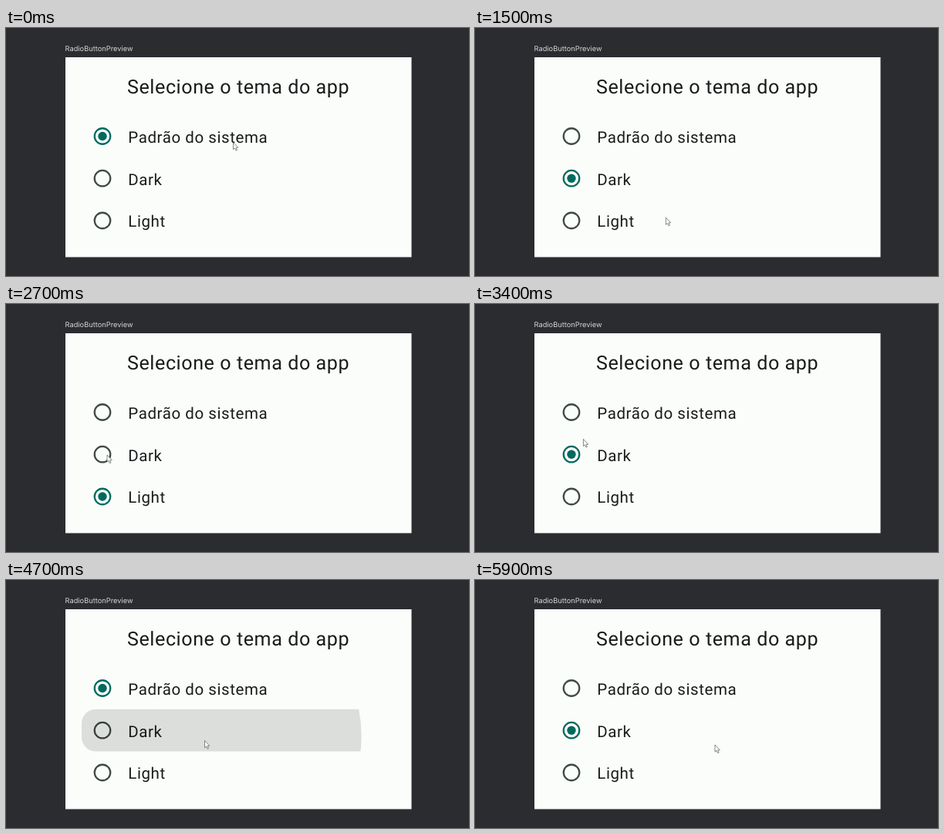
An HTML page for the animation above (6200 ms loop, 600 by 322 pixels).

```html
<!DOCTYPE html>
<html lang="pt">
<head>
<meta charset="utf-8">
<title>RadioButtonPreview</title>
<style>
  html, body { margin: 0; height: 100%; overflow: hidden; background: #2b2c30; }
  svg { display: block; width: 100%; height: 100%; }
  text { font-family: Roboto, sans-serif; fill: #191c1b; letter-spacing: .57px; text-rendering: geometricPrecision; }
  .label { font: 9.3px Inter, sans-serif; fill: #d3d5d9; letter-spacing: 0; }
  .title { font-size: 25.1px; }
  .option { font-size: 20.5px; }
</style>
</head>
<body>
<svg viewBox="0 0 600 322">
  <clipPath id="row"><rect id="rowShape" x="98" width="407" height="54.7" rx="18.3"/></clipPath>
  <rect x="77" y="38" width="448.5" height="259.5" fill="#fafdf9"/>
  <text class="label" x="76.5" y="30.3">RadioButtonPreview</text>
  <text class="title" x="157" y="85">Selecione o tema do app</text>
  <g id="options"></g>
  <g id="clip"><circle id="ripple"/></g>
  <path id="cursor" d="M0 0V9.2L2 7.4L3.5 10.7L5 10L3.6 6.8H6.3Z" fill="#fff" stroke="#555" stroke-width=".7"/>
</svg>
<script>
const LOOP = 6200, STEP = 100;
const SCALE = 1.14; // pixels per dp
const TOUCH = 48 * SCALE, RADIO_X = 125, ROW_X = 301.5, ROW_WIDTH = 407;
const ROW_Y = [140.5, 195.2, 250];
const GREY = [63, 73, 70], TEAL = [0, 106, 96];
const GROW = 225, FADE_IN = 75, FADE_OUT = 100, SELECT = 100;

const clicks = [
  { press: 653, release: 860, row: 1, x: 258, y: 200 },
  { press: 1675, release: 1790, row: 2, x: 246, y: 252 },
  { press: 2780, release: 2960, row: 1, x: 131, y: 196, onRadio: true },
  { press: 3843, release: 3960, row: 0, x: 131, y: 137, onRadio: true },
  { press: 4605, release: 4830, row: 1, x: 258, y: 208 },
];

// time, x, y
const cursorPath = [
  [0, 294.5, 148.5], [500, 257.5, 199], [600, 257.5, 199], [900, 257.5, 202],
  [950, 257.5, 202], [1650, 246, 252], [2050, 246, 252], [2700, 131, 196],
  [3000, 131, 196], [3250, 143, 186], [3750, 131, 137], [4100, 131, 136.5],
  [4500, 257.5, 209], [4700, 257.5, 208.5], [5000, 257.5, 208.5], [5900, 311, 214],
];

const $ = id => document.getElementById(id);
const set = (el, attrs) => { for (const k in attrs) el.setAttribute(k, attrs[k]); };
const clamp = v => Math.min(1, Math.max(0, v));
const mix = (a, b, p) => a + (b - a) * p;
const smooth = p => p * p * (3 - 2 * p);

// cubic-bezier(.4, 0, .2, 1)
function standard(x) {
  let lo = 0, hi = 1, s = .5;
  for (let i = 0; i < 20; i++) {
    s = (lo + hi) / 2;
    const bx = 1.2 * s * (1 - s) ** 2 + .6 * s * s * (1 - s) + s ** 3;
    if (bx < x) lo = s; else hi = s;
  }
  return smooth(s);
}

$('options').innerHTML = ['Padrão do sistema', 'Dark', 'Light'].map((name, i) => `
  <circle class="ring" cx="${RADIO_X}" cy="${ROW_Y[i]}" r="${9 * SCALE}" fill="none" stroke-width="${2 * SCALE}"/>
  <circle class="dot" cx="${RADIO_X}" cy="${ROW_Y[i]}"/>
  <text class="option" x="158.3" y="${ROW_Y[i] + 8.4}">${name}</text>`).join('');
const rings = document.querySelectorAll('.ring'), dots = document.querySelectorAll('.dot');

function drawRadios(t) {
  const level = [1, 0, 0];
  for (const c of clicks) {
    const p = standard(clamp((t - c.release) / SELECT));
    level.forEach((v, i) => level[i] = mix(v, i === c.row ? 1 : 0, p));
  }
  level.forEach((v, i) => {
    const color = `rgb(${GREY.map((g, k) => Math.round(mix(g, TEAL[k], v)))})`;
    set(rings[i], { stroke: color });
    set(dots[i], { fill: color, r: Math.max(0, 6 * v - 1) * SCALE });
  });
}

function drawRipple(t) {
  const c = clicks.findLast(c => t >= c.press) || clicks[0];
  const p = clamp((t - c.press) / GROW);
  const fadeStart = Math.max(c.release + 25, c.press + GROW);
  const alpha = clamp((t - c.press) / FADE_IN) * (1 - clamp((t - fadeStart) / FADE_OUT));
  const width = c.onRadio ? TOUCH : ROW_WIDTH;
  const end = c.onRadio ? 20 * SCALE : Math.hypot(ROW_WIDTH, TOUCH) / 2 + 10 * SCALE;
  set($('rowShape'), { y: ROW_Y[c.row] - TOUCH / 2 });
  set($('clip'), { 'clip-path': c.onRadio ? 'none' : 'url(#row)' });
  set($('ripple'), {
    cx: mix(c.x, c.onRadio ? RADIO_X : ROW_X, p),
    cy: mix(c.y, ROW_Y[c.row], p),
    r: mix(.3 * width, end, standard(p)),
    opacity: .12 * alpha,
  });
}

function drawCursor(t) {
  const i = Math.max(1, cursorPath.findIndex(k => k[0] > t));
  const [a, b] = t >= cursorPath.at(-1)[0] ? cursorPath.slice(-2) : cursorPath.slice(i - 1, i + 1);
  const p = smooth(clamp((t - a[0]) / (b[0] - a[0])));
  set($('cursor'), { transform: `translate(${mix(a[1], b[1], p)} ${mix(a[2], b[2], p)})` });
}

const start = performance.now();
function frame() {
  const t = Math.floor((performance.now() - start) % LOOP / STEP) * STEP;
  drawRadios(t);
  drawRipple(t);
  drawCursor(t);
  requestAnimationFrame(frame);
}
frame();
</script>
</body>
</html>
```
